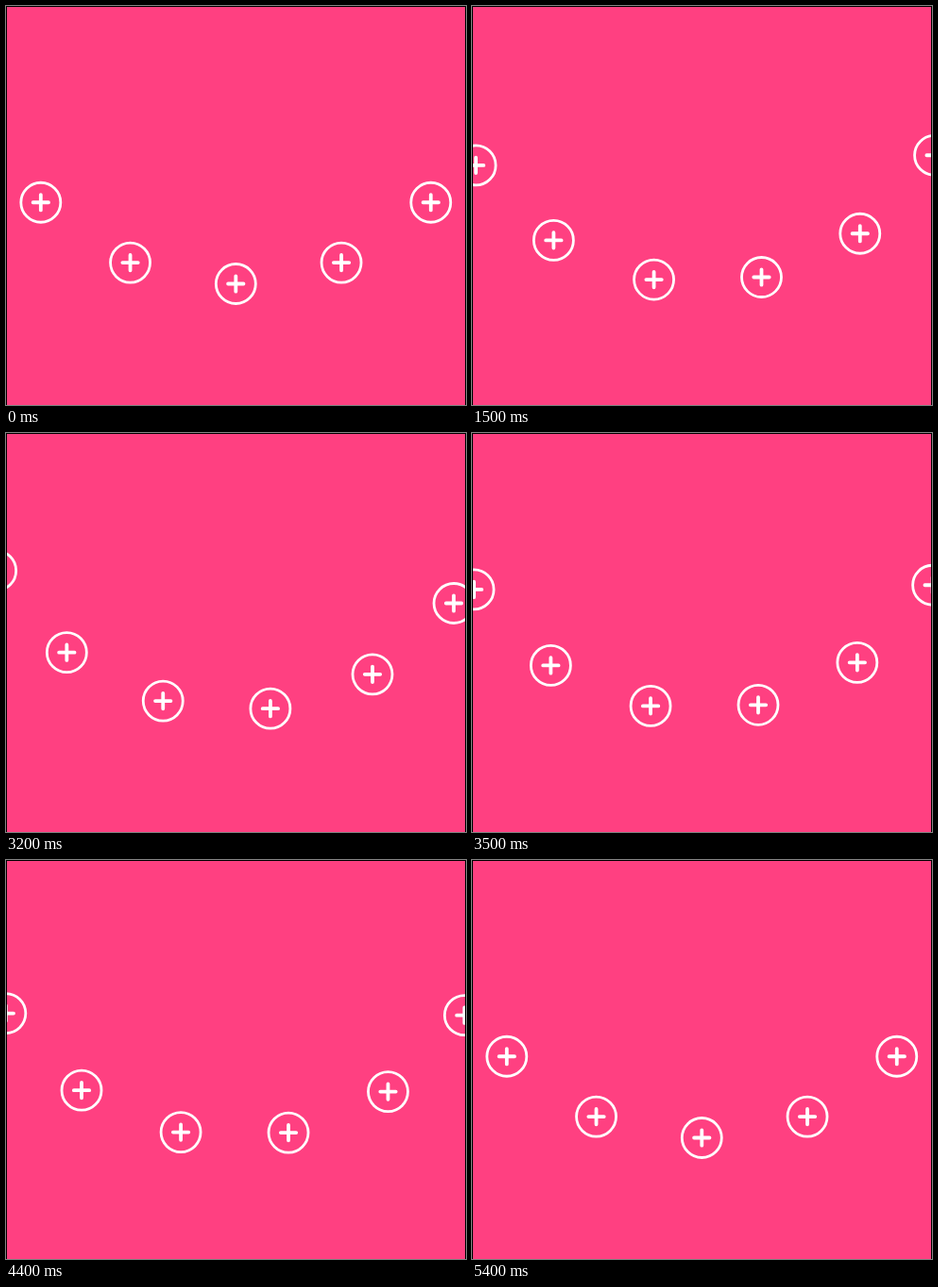
These frames come from a looping animation (487x423 px, 6900 ms). An HTML page with a canvas:

```html
<!DOCTYPE html>
<html>
<head>
<meta charset="utf-8">
<style>
  html, body { margin: 0; height: 100%; overflow: hidden; }
  canvas { display: block; }
</style>
</head>
<body>
<canvas id="stage" width="487" height="423"></canvas>
<script>
const ctx = document.getElementById('stage').getContext('2d');
const LOOP = 6900, STEP = 100;
const SPACING = 22.5;
const CENTER_X = 243.3, RADIUS_X = 292, RADIUS_Y = 294.5;

// Each scroll burst: start time in ms, then the wheel angle at every step.
const bursts = [
  { start: 1300, angles: [-0.4, -6.4, -10, -12.2, -13.4, -13.95] },
  { start: 3200, angles: [-15.3, -22, -28.9, -33.2, -35.6, -36.8, -37.25] },
  { start: 4300, angles: [-36.8, -34, -31.6, -30, -29.2, -28.9] },
  { start: 5100, angles: [-28.4, -22.3, -11.5, 0] }
];

function wheelAngle(time) {
  let angle = 0;
  for (const { start, angles } of bursts) {
    if (time < start) break;
    const step = Math.floor((time - start) / STEP);
    angle = angles[Math.min(step, angles.length - 1)];
  }
  return angle;
}

function drawIcon(x, y) {
  ctx.lineWidth = 2.8;
  ctx.beginPath();
  ctx.arc(x, y, 21, 0, 2 * Math.PI);
  ctx.stroke();

  ctx.lineWidth = 3.8;
  ctx.beginPath();
  ctx.moveTo(x - 8.2, y);
  ctx.lineTo(x + 8.2, y);
  ctx.moveTo(x, y - 8.2);
  ctx.lineTo(x, y + 8.2);
  ctx.stroke();
}

function draw(now) {
  ctx.fillStyle = '#ff4081';
  ctx.fillRect(0, 0, 487, 423);

  ctx.strokeStyle = '#fff';
  ctx.lineCap = 'round';
  const turn = wheelAngle(now % LOOP);
  for (let i = 0; i < 16; i++) {
    const a = (i * SPACING + turn) * Math.PI / 180;
    drawIcon(CENTER_X + RADIUS_X * Math.sin(a), RADIUS_Y * Math.cos(a));
  }

  // Hide the upper part of the wheel, which never shows on the stage.
  ctx.fillStyle = '#ff4081';
  ctx.fillRect(0, 0, 487, 100);

  ctx.fillStyle = '#000';
  ctx.fillRect(0, 0, 487, 1);
  ctx.fillRect(0, 0, 1, 423);
  ctx.fillRect(486, 0, 1, 423);
}

const begin = performance.now();
function tick() {
  draw(performance.now() - begin);
  requestAnimationFrame(tick);
}
tick();
</script>
</body>
</html>
```
